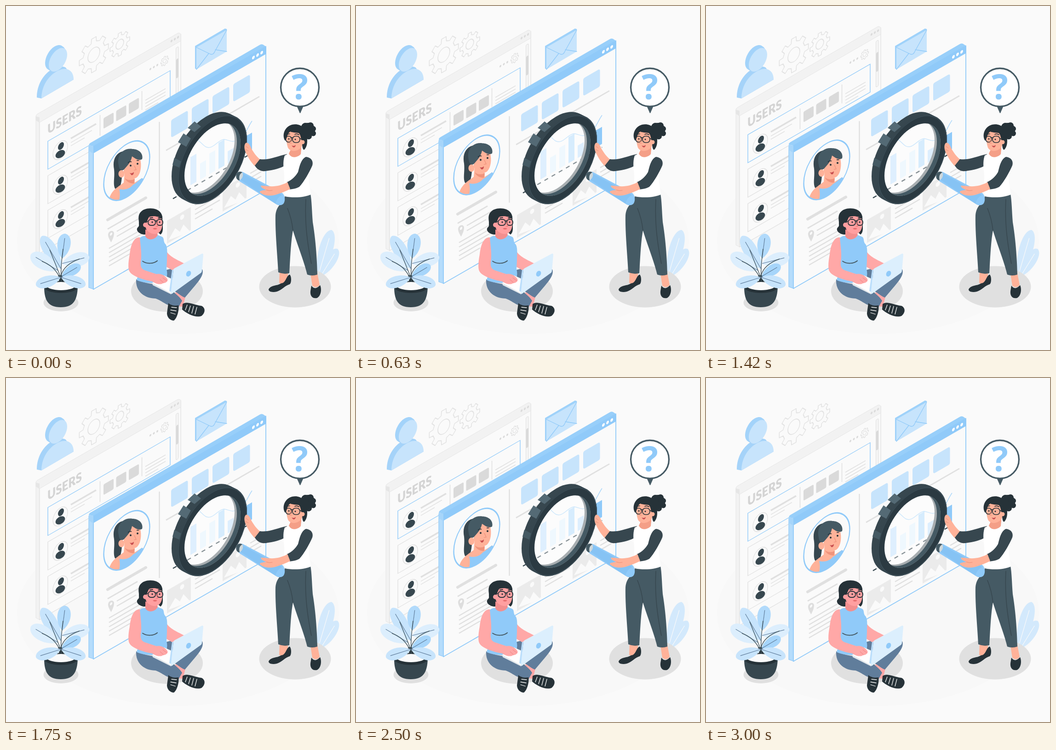
These frames come from a looping animation (748x748 px, 3040 ms). An HTML page:

```html
<!DOCTYPE html>
<html lang="en">
<head>
<meta charset="utf-8">
<title>User research</title>
<style>
html, body { margin: 0; width: 100%; height: 100%; overflow: hidden; background: #fafafa; }
svg { display: block; width: 100vw; height: 100vh; }
.title { font: 900 28px Lato, "Open Sans", sans-serif; fill: #d4d4d4; }
.ask { font: 700 75px "Open Sans", Lato, sans-serif; fill: #90caf9; text-anchor: middle; }
.line { fill: none; stroke-linecap: round; stroke-linejoin: round; }
</style>
</head>
<body>
<svg viewBox="0 0 748 748">
  <defs>
    <clipPath id="portrait"></clipPath>
    <clipPath id="hole"></clipPath>
    <mask id="rim" maskUnits="userSpaceOnUse" x="0" y="0" width="748" height="748"></mask>
  </defs>

  <ellipse cx="374" cy="511" rx="350" ry="202" fill="#f8f8f8"/>

  <!-- user symbol -->
  <g>
    <path d="M67 199C67 172 81 147 103 136C112 130 123 130 130 134L147 160L77 201Z" fill="#90caf9" opacity=".8"/>
    <path d="M77 201C77 176 90 153 112 141C131 131 147 139 147 160Z" fill="#c7e4fc"/>
    <g id="head"></g>
  </g>

  <g id="gears" fill="none" stroke="#e2e2e2" stroke-width="1.6"></g>
  <g id="back"></g>

  <!-- envelope -->
  <g>
    <path d="M411 87L476 49L480 50V54L415 92V138L411 136Z" fill="#9fd2fa"/>
    <path d="M414 90L480 52V99L414 138Z" fill="#c7e4fc"/>
    <path class="line" d="M414 90L443 104Q450 108 454 99L480 52M414 138L441 103M480 99L455 95" stroke="#90caf9" stroke-width="1.3"/>
  </g>

  <g id="front"></g>

  <!-- foliage on the right -->
  <g id="bush"></g>

  <!-- floor shadows -->
  <g fill="#e0e0e0">
    <ellipse cx="628.500" cy="610.500" rx="78" ry="45"/>
    <ellipse cx="350" cy="620" rx="78" ry="45"/>
    <ellipse cx="119.500" cy="645" rx="38" ry="19"/>
  </g>

  <!-- magnifier -->
  <g id="lens"></g>
  <path d="M502 376C500 366 507 358 515 361L600 406C608 412 607 424 602 430C597 434 590 433 586 430L509 382Z" fill="#90caf9"/>
  <path d="M507 376L516 365L598 409L604 418C598 410 590 416 586 430Z" fill="#7fbdf0" opacity=".55"/>
  <path d="M501 366C503 360 510 359 514 362C517 367 514 376 508 379C502 379 499 373 501 366Z" fill="#cfd8dc"/>
  <path d="M501 366C503 360 510 359 514 362C508 364 506 371 508 379C502 379 499 373 501 366Z" fill="#455a64"/>

  <!-- speech bubble -->
  <path d="M632 216L639.500 233L647 216Z" fill="#455a64" stroke="#455a64" stroke-linejoin="round"/>
  <circle cx="639" cy="177" r="41.500" fill="#fff" stroke="#455a64" stroke-width="3.300"/>
  <text class="ask" x="639" y="203">?</text>

  <!-- standing woman -->
  <g>
    <path d="M595 572L594 602C602 607 610 599 613 590V572ZM661 576L666 608C672 614 680 611 682 606L676 576Z" fill="#ffb299"/>
    <path d="M571 616C577 606 590 609 598 603C609 603 609 586 617 584C621 588 621 602 617 605C606 608 601 617 589 621C580 623 571 622 571 616Z" fill="#263238"/>
    <path d="M664 608C671 618 678 612 683 607C687 616 685 631 676 635C666 637 661 630 662 620Z" fill="#263238"/>
    <path d="M607 412C604 428 588 432 586 455C585 490 590 540 592 579Q604 584 616 581C618 550 619 515 624 488C632 515 648 555 655 584Q666 588 677 584C676 540 672 500 667 470C665 445 665 425 662 408Z" fill="#455a64"/>
    <path class="line" d="M624 488C622 470 617 452 612 440M652 420C650 460 652 500 664 560" stroke="#37474f" stroke-width="1.5"/>
    <path d="M502 376M586 430C588 420 596 410 604 412C608 418 606 428 602 431C596 435 590 433 586 430Z" fill="#90caf9"/>
    <path d="M553 334C545 328 538 318 533 309C531 303 526 295 521 298C516 304 519 315 523 322C529 334 535 342 541 348Z" fill="#ffb299"/>
    <path class="line" d="M522 305L527 309M521 312L527 315" stroke="#ed8f78" stroke-width="1"/>
    <path d="M611 322C590 326 572 336 552 333L541 347C546 356 555 360 564 359C582 357 598 352 607 347Z" fill="#37474f"/>
    <path d="M606 325C601 340 604 353 605 370C605 386 603 400 607 414C625 418 650 416 663 410C661 391 656 382 660 360C664 345 664 334 652 327L640 321C632 329 620 328 615 321Z" fill="#fff"/>
    <path d="M652 328C664 329 669 338 666 347C660 361 648 382 638 393C632 397 622 398 617 399L611 383C622 378 630 370 635 361C639 345 642 333 652 328Z" fill="#37474f"/>
    <path d="M612 383C600 390 585 393 575 392C567 392 560 390 554 391C555 396 562 398 566 400C557 401 551 402 552 405C560 413 575 414 588 410C600 406 610 402 618 398Z" fill="#ffb299"/>
    <path class="line" d="M566 400Q573 403 579 401" stroke="#ed8f78" stroke-width="1"/>
    <path d="M622 306L615 321C620 332 634 330 641 322L643 299Z" fill="#f49f87"/>
    <g fill="#263238">
      <circle cx="657" cy="269" r="15"/><circle cx="651" cy="263" r="9"/><circle cx="662" cy="260" r="7"/>
      <circle cx="668" cy="267" r="6"/><circle cx="668" cy="277" r="6"/><circle cx="658" cy="283" r="7"/>
    </g>
    <path d="M611 275C614 265 640 266 645 278C650 292 646 305 638 311C630 317 618 317 613 308C609 296 609 284 611 275Z" fill="#ffb299"/>
    <path d="M607 293C599 281 606 262 622 258C640 254 651 266 652 276C657 290 656 306 648 313C642 309 646 299 642 290C640 282 640 279 636 276C628 275 623 275 618 273C611 278 612 286 607 293Z" fill="#263238"/>
    <circle cx="645" cy="296" r="4.500" fill="#ffb299"/>
    <g class="line" stroke="#263238" stroke-width="1.700">
      <rect x="608.500" y="283" width="12" height="13" rx="5.500"/><rect x="623" y="283" width="16" height="14" rx="6.500"/>
      <path d="M620 287Q622 285 623.500 287M639 288L646 291M612 279L617 278M628 279Q633 277 637 280"/>
    </g>
    <circle cx="615" cy="289" r="1.600" fill="#263238"/><circle cx="629" cy="290" r="1.600" fill="#263238"/>
    <path class="line" d="M620 289L617 298L621 299" stroke="#ed8f78" stroke-width="1.200"/>
    <path d="M621 303Q626 306 630 302Q629 309 624 307Z" fill="#c95050"/>
  </g>

  <!-- sitting woman -->
  <g>
    <path d="M372 620L390 632L385 654L360 652L353 640Z" fill="#ffa8a7"/>
    <path d="M345 575C380 565 417 566 427 573C431 584 420 597 411 608L389 634C382 632 374 624 366 620L330 604Z" fill="#607d9b"/>
    <path d="M283 594C295 604 340 605 354 615C366 623 378 632 383 641L375 655C352 655 340 641 325 636C303 636 281 622 283 594Z" fill="#607d9b"/>
    <path class="line" d="M326 605C342 609 354 614 365 624" stroke="#455a64" stroke-width="1.300"/>
    <path d="M353 646C360 652 368 652 375 651C377 661 372 679 365 684C357 684 350 677 350 668Z" fill="#263238"/>
    <path d="M384 648C393 641 405 649 425 652C434 656 434 667 425 674C413 679 393 669 383 660Z" fill="#263238"/>
    <path class="line" d="M360 655L371 656M358 661L370 663M358 667L368 670M394 650L390 661M401 652L397 665M408 653L404 668M415 655L411 670" stroke="#fafafa" stroke-width="1.300"/>
    <path d="M347 530C355 546 372 551 391 562C388 570 374 573 362 575L347 566Z" fill="#ffa8a7"/>
    <path d="M291 504C297 499 302 500 304 500C309 510 324 508 330 498L340 502C345 506 341 512 347 518C352 525 350 540 350 552L349 572C352 584 350 592 345 598C325 605 300 603 284 596C289 580 294 570 291 555C288 540 288 520 291 504Z" fill="#90caf9"/>
    <path class="line" d="M297 555C306 561 321 561 329 554" stroke="#455a64" stroke-width="2"/>
    <path d="M318 602L344 586L372 598L359 627L319 607Z" fill="#e3e8ec"/>
    <path d="M318 602L344 586L370 600L358 624Z" fill="#fff"/>
    <path d="M291 503C277 503 271 520 269 540C266 556 265 570 268 576C272 587 300 596 318 599C325 604 336 607 341 603C350 602 354 597 350 592C344 585 336 581 327 583L300 574C294 570 292 566 293 556C296 540 292 518 291 503Z" fill="#ffa8a7"/>
    <path class="line" d="M342 601L335 595M349 597L341 591" stroke="#ed8282" stroke-width="1"/>
    <path d="M364 573Q365 571 367 570L425 539Q429 537 429 541L426 576Q426 579 423 581L362 625Q358 628 359 622Z" fill="#dceffd"/>
    <path d="M359 622L364 573L361 574L355 620Z" fill="#bbdefb"/>
    <ellipse cx="397" cy="582" rx="5" ry="6.500" fill="#90caf9" transform="rotate(28 397 582)"/>
    <path d="M290 470C284 452 295 440 314 440C333 440 342 452 340 466C341 480 343 492 336 497L328 490L302 497C292 497 281 489 286 482C290 479 290 474 290 470Z" fill="#263238"/>
    <path d="M303 486V501C309 511 324 509 330 498L328 490Z" fill="#f28f8f"/>
    <path d="M302 466C304 456 324 454 337 460C341 468 341 481 336 489C330 498 318 497 310 491C304 487 301 477 302 466Z" fill="#ff9fa0"/>
    <path d="M289 470C287 450 300 441 314 441C331 440 341 451 340 463C329 456 318 456 311 459C306 467 305 476 302 486C296 490 288 484 289 470Z" fill="#263238"/>
    <circle cx="303" cy="476" r="5" fill="#ff9fa0"/>
    <g class="line" stroke="#263238" stroke-width="1.800">
      <rect x="309" y="464" width="16" height="13" rx="6"/><rect x="328" y="464" width="13" height="13" rx="5.500"/>
      <path d="M325 468Q327 466 328 468M309 469L301 467M313 461L319 460M331 461L336 461"/>
    </g>
    <circle cx="318" cy="470" r="1.700" fill="#263238"/><circle cx="334" cy="470" r="1.700" fill="#263238"/>
    <path class="line" d="M327 471L330 479L326 480" stroke="#ed6f70" stroke-width="1.200"/>
    <path d="M319 484Q324 481 329 484Q324 488 319 484Z" fill="#e46a6c"/>
  </g>

  <!-- potted plant -->
  <path d="M83 610C83 638 90 655 119 655C148 655 155 638 156 610Z" fill="#37474f"/>
  <ellipse cx="119.500" cy="611" rx="36.500" ry="13" fill="#263238"/>
  <ellipse cx="119.500" cy="609" rx="30" ry="9" fill="#fafafa"/>
  <path d="M113 586L128 584L126 598L116 600Z" fill="#263238"/>
  <g id="leaves"></g>
</svg>

<script>
const SLOPE = .577, ROUND = 1.155;
const BLUE = '#90caf9', PALE = '#c7e4fc', GREY = '#e0e0e0', DARK = '#37474f';
const $ = id => document.getElementById(id);
const put = (id, ...parts) => $(id).innerHTML = parts.flat().join('');
const list = (n, make) => Array.from({ length: n }, (_, i) => make(i));
const iso = (x, y) => `transform="matrix(1 ${-SLOPE} 0 1 ${x} ${y})"`;

// Shapes lying in the plane of the windows; x, y are on the stage.
const tile = (x, y, w, h, r, paint) =>
  `<rect width="${w}" height="${h}" rx="${r}" ${iso(x, y)} ${paint}/>`;
const oval = (x, y, r, paint = '') =>
  `<ellipse rx="${r}" ry="${r * ROUND}" ${iso(x, y)} ${paint}/>`;
const bar = (x, y, w, size = 2, color = GREY, extra = '') =>
  `<path d="M${x} ${y}l${w} ${-w * SLOPE}" stroke="${color}" stroke-width="${size}" fill="none" ${extra}/>`;
const path = (d, paint) => `<path d="${d}" ${paint}/>`;
const fill = c => `fill="${c}"`;
const line = (c, w = 1.5) => `fill="none" stroke="${c}" stroke-width="${w}"`;

function gear(x, y, r, teeth, hole) {
  const pts = [];
  for (let i = 0; i < teeth; i++)
    for (const [a, k] of [[-.3, .75], [-.2, 1], [.2, 1], [.3, .75]]) {
      const t = (i + a) / teeth * 2 * Math.PI;
      pts.push(`${r * k * Math.cos(t) / ROUND},${r * k * Math.sin(t)}`);
    }
  return `<polygon points="${pts.join(' ')}" stroke-linejoin="round" ${iso(x, y)}/>` + oval(x, y, hole);
}

function leaf(x, y, tx, ty, w, color, vein) {
  const dx = tx - x, dy = ty - y, len = Math.hypot(dx, dy);
  const at = (k, s) => `${x + dx * k - dy / len * w * s} ${y + dy * k + dx / len * w * s}`;
  return path(`M${x} ${y}C${at(.3, .8)} ${at(.95, .8)} ${tx} ${ty}C${at(.95, -.8)} ${at(.3, -.8)} ${x} ${y}Z`, fill(color)) +
    path(`M${x} ${y}L${at(.82, 0)}`, line(vein, 1.2));
}

put('head', oval(106, 112, 21, fill('#a3d3fa')), oval(109, 114, 21, fill('#a3d3fa')),
  oval(113, 117, 20, fill(PALE)));
put('gears', gear(191, 106, 37, 8, 13), gear(247.500, 83, 25, 8, 8.500));

// Rear window
const userRow = i => {
  const y = 294 + i * 75;
  return tile(91, y, 266, 61, 0, line(i ? GREY : BLUE, 1.400)) +
    oval(118, y + 19.500, 16, `fill="#fafafa" stroke="${GREY}" stroke-width="1.3"`) +
    oval(119.500, y + 10.500, 6.500, fill(DARK)) +
    `<ellipse cx="118" cy="${y + 28}" rx="11.500" ry="7.500" transform="rotate(-36 118 ${y + 28})" fill="${DARK}"/>` +
    bar(141, y - 6, 55, 3.500) + bar(141, y + 3, 46, 1.400) + bar(141, y + 10, 30, 1.400);
};
put('back',
  path('M65 240V534L73 538V254Z', 'fill="#f2f2f2" stroke="#e6e6e6"'),
  path('M73 239L380 62V361L73 538Z', 'fill="#fafafa" stroke="#e2e2e2" stroke-width="1.3"'),
  path('M65 240Q65 237 68 235L372 60Q376 57 380 61L380 76L73 253L65 248Z', 'fill="#f2f2f2" stroke="#e6e6e6"'),
  path('M65 240L73 242V253L65 249Z', fill('#e6e6e6')),
  list(3, i => oval(360 + i * 7, 76 - i * 4, 2.200, fill('#dcdcdc'))),
  tile(369.500, 91, 5.500, 100, 2.700, 'fill="#f5f5f5" stroke="#e0e0e0"'),
  tile(370, 116, 5, 42, 2.500, fill('#dadada')),
  `<g transform="matrix(.866 ${-SLOPE * .866} 0 1 90 279)"><text class="title">USERS</text></g>`,
  list(3, i => oval(314 + i * 7.500, 137 - i * 4.300, 2, fill('#dadada'))),
  `<g fill="none" stroke="#dadada">${gear(345, 119.500, 10, 8, 3.500)}</g>`,
  list(3, userRow),
  list(3, i => tile(212 + i * 27.500, 244 - i * 16, 22, 23, 2.500, fill('#dadada'))),
  path('M204.500 237V282M295.500 185V226', line(GREY)),
  list(4, i => bar(303, 205 + i * 7, i == 3 ? 28 : 44, 1.500))
);

// Front window
const picture = (x, y) => tile(x, y, 52, 50, 0, fill('#ebebeb')) +
  path(`M${x + 3} ${y + 42}l15 -26l10 8l8 -16l13 14v3z`, fill('#fafafa')) +
  oval(x + 33, y - 8, 4.500, fill('#fafafa'));
const column = (x, h, color) => {
  const base = 411 - (x - 364) * SLOPE;
  return path(`M${x} ${base}v${-h}l13 ${-13 * SLOPE}v${h}z`, fill(color));
};
const portrait = [
  path('M205 290H320V430H205Z', fill('#fafafa')),
  path('M254 316C238 320 231 336 235 355C237 374 232 386 237 397C243 399 248 396 250 386C254 370 250 352 258 342Z', fill(DARK)),
  path('M258 362L256 384C240 396 226 402 222 430H305L296 374L280 384L279 366Z', fill('#ffb299')),
  path('M258 374Q268 382 280 376L278 386Q264 386 258 374Z', fill('#f0947c')),
  path('M244 430Q250 412 246 398C259 401 269 397 276 389C285 384 290 377 296 374L304 382L300 430Z', fill(BLUE)),
  path('M256 335C258 322 286 317 291 330C296 346 293 366 284 373C272 380 260 375 256 360Z', fill('#ffb299')),
  path('M245 347C239 322 257 308 275 311C290 311 299 322 296 333C287 338 280 330 274 327C272 339 264 347 258 354C252 361 246 356 245 347Z', fill('#455a64')),
  '<ellipse cx="251" cy="365" rx="6.500" ry="8" fill="#ffb299"/>',
  '<circle cx="271" cy="347" r="2" fill="#263238"/><circle cx="286" cy="343" r="2" fill="#263238"/>',
  path('M265 341Q269 337 273 339M284 336L289 336', line('#263238', 1.600)),
  path('M279 347L283 356L278 357', line('#ed8f78', 1.200)),
  path('M269 363Q274 365 278 361Q278 368 273 368Z', fill('#c95050'))
].join('');
put('portrait', oval(262.500, 358, 50));
put('front',
  path('M180 306V612L191 616V314Z', 'fill="#b5dcfb" stroke="#90caf9" stroke-width="1.2"'),
  path('M190 304L565 88V400L190 616Z', 'fill="#fafafa" stroke="#90caf9" stroke-width="1.8" stroke-linejoin="round"'),
  path('M180 303Q180 300 183 298L551 85Q555 82 559 84L565 88L190 305Z', fill('#98cffa')),
  path('M189 305L560 90Q566 87 566 93V104L189 321Z', fill(BLUE)),
  path('M180 303L190 305V321L180 315Z', fill('#a6d5fa')),
  list(3, i => oval(538 + i * 9, 112 - i * 5.300, 2.900, fill('#fff'))),
  path('M333.500 252V440', line(GREY, 2.500)),
  bar(348, 314, 203, 2.800),
  list(4, i => tile(359 + i * 45, 248 - i * 26, 36.500, 38.500, 4, fill(PALE))),
  `<g clip-path="url(#portrait)">${portrait}</g>`,
  oval(262.500, 358, 50, line(BLUE, 2.400)),
  bar(221, 465, 83, 6, GREY, 'stroke-linecap="round"'),
  bar(221, 485, 65, 2.800),
  path('M228.500 514C224 506 222 502 222 497C223 488 234 486 235 494C235 501 232 507 228.500 514Z', fill('#dedede')),
  oval(228.500, 496, 2.600, fill('#fafafa')),
  bar(241, 490, 60, 2.400), bar(241, 501, 42, 2.400),
  list(5, i => bar(224, 527 + i * 9.500, i == 4 ? 46 : 76, 2.400)),
  column(401, 61, PALE), column(422, 35, '#e3f2fd'), column(442, 45, '#e3f2fd'),
  column(462, 57, '#bbdefb'), column(482, 27, PALE), column(502, 36, PALE), column(522, 37, BLUE),
  path('M395 306C414 276 421 298 434 306C450 314 460 291 474 290C486 291 492 300 505 289C520 284 526 262 535 250', line('#a9d6fa', 1.500)),
  bar(363, 419, 172, 2.400, DARK, 'stroke-dasharray="9 9"'),
  picture(350, 467), picture(471, 397),
  list(4, i => bar(411, 433 + i * 10, i == 3 ? 38 : 54, 2.400)),
  list(3, i => bar(531, 364 + i * 10, 24, 2.400))
);

// Magnifier ring: a thick disc with a hole and a visible inner wall.
const inner = (dx, dy) => {
  const r = 61, k = SLOPE * r;
  const x = 449 + dx, y = 334 + dy;
  return `M${x - r} ${y + k}l0 0` && oval(x, y, r, 'fill="black"');
};
put('hole', oval(449, 334, 61));
put('rim', '<rect width="748" height="748" fill="white"/>', inner(0, 0));
const wall = (id, dx, dy, color) =>
  `<mask id="${id}" maskUnits="userSpaceOnUse" x="0" y="0" width="748" height="748">
   <rect width="748" height="748" fill="white"/>${inner(dx, dy)}</mask>
   <rect x="360" y="230" width="170" height="210" fill="${color}" mask="url(#${id})"/>`;
put('lens',
  '<g clip-path="url(#hole)">',
  oval(449, 334, 61, 'fill="#fff" opacity=".4"'),
  wall('wall1', -13, -7, '#a7adb0'), wall('wall2', -8, -4, '#455a64'),
  '</g><g mask="url(#rim)">',
  list(9, i => oval(435 + i * 1.750, 327 + i * .875, 75, fill(DARK))),
  path('M374 296L392 306L402 288L386 277ZM395 265L410 274L424 262L410 251Z', fill('#546a75')),
  path('M362 345L380 353L383 339L366 330Z', fill('#455a64')),
  oval(449, 334, 75, fill('#2b3a42')),
  oval(449, 334, 74, line('#3f525c', 1.200)),
  '</g>'
);

put('bush',
  leaf(679, 586, 708, 487, 25, '#d3e9fc', '#fafafa'),
  leaf(684, 588, 721, 528, 21, '#d3e9fc', '#fafafa'));

const STEM = '#607d9b';
put('leaves',
  leaf(120, 572, 78, 500, 25, PALE, STEM),
  leaf(122, 549, 129, 495, 24, '#b1dafb', STEM),
  leaf(113, 575, 54, 540, 28, '#dceefd', STEM),
  leaf(122, 560, 181, 545, 25, '#dceefd', STEM),
  leaf(121, 588, 162, 564, 19, '#a6d5fa', STEM),
  path('M120 600C119 575 120 560 124 528M119 590C112 572 103 550 95 530M120 585C125 568 140 557 160 550M118 592C108 572 96 562 78 555', line('#455a64', 1.400)),
  leaf(119, 590, 65, 607, 21, PALE, STEM),
  leaf(120, 590, 173, 607, 21, PALE, STEM));

// Both windows float up and down at a steady speed, 24 poses a second.
const LOOP = 3040, STEP = 1000 / 24, RISE = 15;
const lift = (t, period) => -RISE * (1 - Math.abs(1 - 2 * (t % period) / period));
function draw() {
  const now = performance.now() % LOOP;
  const t = Math.min(72, Math.floor((now + 5) / STEP)) * STEP;
  $('front').setAttribute('transform', `translate(0 ${lift(t, 1500)})`);
  $('back').setAttribute('transform', `translate(0 ${lift(t, 3000)})`);
  requestAnimationFrame(draw);
}
draw();
</script>
</body>
</html>
```
